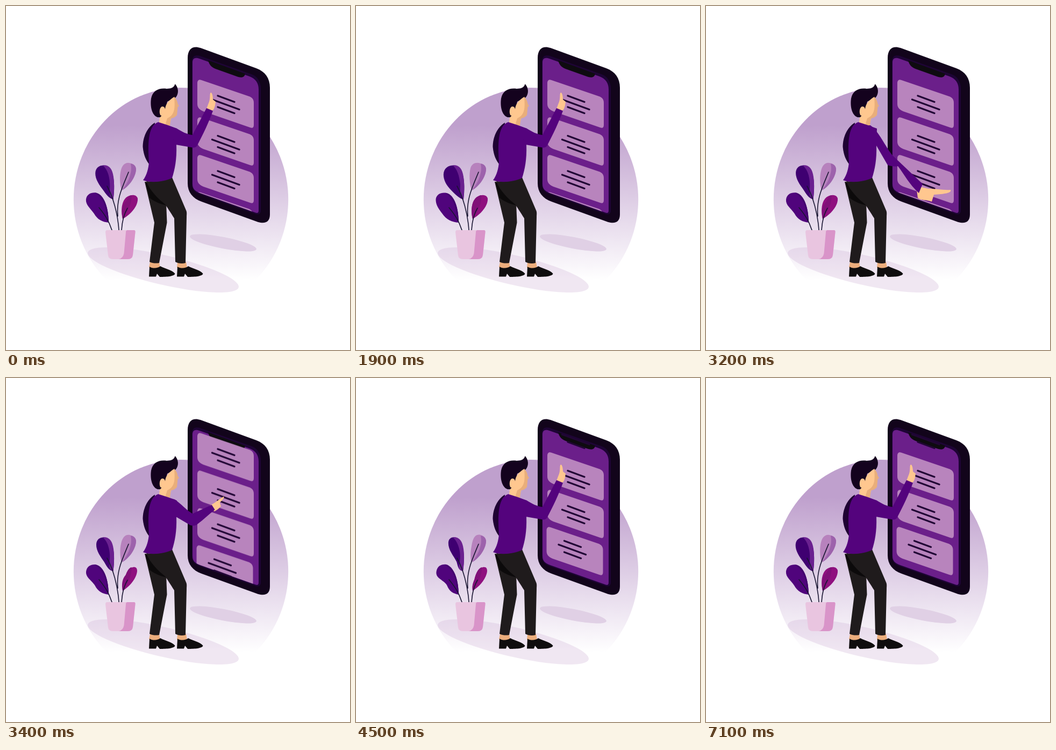
These frames come from a looping animation (640x640 px, 7.2 s). An HTML page:

```html
<!DOCTYPE html>
<html lang="en">
<head>
<meta charset="utf-8">
<title>Scrolling a phone</title>
<style>
  html, body { margin: 0; width: 100%; height: 100%; overflow: hidden; background: #fff; }
  svg { display: block; width: 100%; height: 100%; }

  /* Leaves swing between a narrow and a wide shape. */
  .leaf { d: var(--wide); animation: sway 3600ms cubic-bezier(.37, 0, .63, 1) -2100ms infinite alternate; }
  @keyframes sway { from { d: var(--narrow); } to { d: var(--wide); } }

  .arm { d: var(--up); animation: swipe 7200ms cubic-bezier(.65, 0, .35, 1) infinite; }
  @keyframes swipe {
    0%, 39.58% { d: var(--up); }
    44.44% { d: var(--down); }
    49.39%, 100% { d: var(--up); }
  }

  .list { animation: scroll 7200ms cubic-bezier(.45, 0, .55, 1) infinite; }
  @keyframes scroll {
    0%, 44.44% { transform: translateY(0); }
    50%, 100% { transform: translateY(-69px); }
  }
  .leaving { animation: leave 7200ms linear infinite; }
  @keyframes leave { 0%, 47.3% { opacity: 1; } 49%, 100% { opacity: 0; } }

  .stem { fill: none; stroke: #191632; stroke-width: 1.6; stroke-linecap: round; }
  .text { fill: none; stroke: #210635; stroke-width: 3.4; stroke-linecap: round; }
</style>
</head>
<body>
<svg viewBox="0 0 640 640">
  <defs>
    <linearGradient id="sky" gradientUnits="userSpaceOnUse" x1="0" y1="222" x2="0" y2="510">
      <stop offset="0" stop-color="#bfa0cd"/>
      <stop offset="1" stop-color="#fff"/>
    </linearGradient>
    <path id="bezel" d="M346 104C346 93 352 90 361 93L457 127C468 131 474 141 474 154V380C474 387 470 389 464 387L360 350C350 346 346 341 346 331Z"/>
    <path id="screen" d="M347 105C347 97 352 95 360 98L453 131C464 135 470 143 470 155V380C470 385 468 386 463 384L361 348C351 344 347 340 347 331Z"/>
    <clipPath id="inBezel"><use href="#bezel"/></clipPath>
    <clipPath id="inScreen"><use href="#screen"/></clipPath>
    <path id="card" fill="#b884bd" d="M356 144C356 138 359 136 364 138L452 168C458 170 461 174 461 180V221C461 226 459 228 454 226L367 196C360 193 356 189 356 182Z"/>
    <path id="lines" class="text" d="M394 167L425 178.500M383.500 174L434 192.500M394 188L425 199.500"/>
    <path id="shoe" fill="#0f0d0e" d="M267 485C273 489 283 488 287 484C296 489 309 491 314.500 498C313 503 300 504 286 504L281 498L279 503.500H266Z"/>
  </defs>

  <ellipse cx="325.500" cy="360" rx="199.700" ry="208" fill="url(#sky)"/>
  <ellipse cx="292.500" cy="491" rx="144" ry="27.500" fill="#c39ecb" opacity=".25" transform="rotate(13 292.500 491)"/>
  <ellipse cx="404" cy="440.500" rx="63" ry="10.700" fill="#e0d0e5" transform="rotate(11 404 440.500)"/>

  <g id="phone">
    <path fill="#12041b" d="M338 97C338 80 347 73 362 78L466 116C482 122 491 134 491 152V388C491 401 483 406 469 402L364 364C347 358 338 346 338 330Z"/>
    <use href="#bezel" fill="#1e0435"/>
    <use href="#screen" fill="#6b1f8a"/>
    <path fill="#0e0b10" d="M376 101L445 126C444 132 440 134 432 132L390 117C382 114 378 109 376 101Z"/>
    <g clip-path="url(#inScreen)">
      <g class="list">
        <use href="#card" class="leaving"/>
        <use href="#card" y="70"/>
        <use href="#card" y="140"/>
        <use href="#card" x="-1.500" y="209"/>
      </g>
    </g>
    <g clip-path="url(#inBezel)">
      <g class="list">
        <use href="#lines"/>
        <use href="#lines" y="74.500"/>
        <use href="#lines" y="140"/>
        <use href="#lines" x="-6.500" y="205"/>
      </g>
    </g>
  </g>

  <g id="plant">
    <path class="leaf" fill="#3f0071"
      style="--wide:path('M200 360C192 358 184 350 176 342C168 334 162.500 324 162.500 314C163 300 174 295 186 297C198 300 205 325 200 360Z');
             --narrow:path('M199 359C190 358 190 350 188 342C183 331 172 320 172.500 306C173 297 180 295 187 297C198 300 204 325 199 359Z')"/>
    <path class="leaf" fill="#6b2190"
      style="--wide:path('M180 296.500C192 295 198 303 200 318C202 332 201 348 200 360C192 353 194 342 194 331C192 315 188 303 180 296.500Z');
             --narrow:path('M180 296.500C192 295 198 303 200 318C202 332 201 348 199 359C189 358 191 351 192 346C197 330 192 306 180 296.500Z')"/>
    <path class="leaf" fill="#b782bd"
      style="--wide:path('M215 343C211 330 210 312 213 301C216 292 224 290 232 293C238 294 242 298 242 304C241 320 228 336 215 343Z');
             --narrow:path('M214 343C213 331 213 324 215 314C217 300 221 290 230 291.500C238 293 242 298 242 304C241 320 228 336 214 343Z')"/>
    <path fill="#9d62ac" d="M232 293.500C238 294 242 298 242 304C241 320 228 336 216 343C226 330 236 312 232 293.500Z"/>
    <path class="leaf" fill="#50047c"
      style="--wide:path('M191 403C178 402 168 398 160 386C152 376 148 368 148.500 359C150 349 160 346 169 348C183 352 191 375 191 403Z');
             --narrow:path('M191 403C181 401 174 397 170 386C165 376 148 374 149.500 361C151 349 160 346 168 347C181 350 191 375 191 403Z')"/>
    <path fill="#43006e" d="M165 347.500C182 348 191 375 191 403C185 388 189 362 165 347.500Z"/>
    <path class="leaf" fill="#8f107f"
      style="--wide:path('M217 396C213 380 215 360 227 354C235 350 243 351 245 358C246 372 232 388 217 396Z');
             --narrow:path('M217 396C216 388 217 384 220 376C223 362 228 354 236 352C241 351 244 353 244 359C243 373 230 388 217 396Z')"/>
    <path class="leaf" fill="#801078"
      style="--wide:path('M217 396C213 380 215 360 227 354C229 353 231 352 233 352C235 368 225 384 217 396Z');
             --narrow:path('M217 396C216 388 217 384 220 376C223 362 228 354 234 352C235 368 225 384 217 396Z')"/>
    <path class="stem" d="M188 335C199 355 208 386 210 417M228 309C216 338 205 360 208 391M173 375C182 386 191 398 197 417M226 376C219 388 216 400 215 417"/>
    <path fill="#e9c5e0" d="M188 417H238Q241 417 240.500 421L236 463Q235 471 227 471H198Q191 471 190 464L185 421Q185 417 188 417Z"/>
    <path fill="#d994c9" d="M226 417H238Q241 417 240.500 421L236 463Q235 471 227 471H210Q218 469 219.500 460L223 421Q223 417 226 417Z"/>
  </g>

  <g id="person">
    <path fill="#ecae7d" d="M268 476H285L287 488Q276 492 266 486ZM319 476H335L337 487Q328 491 318 487Z"/>
    <use href="#shoe"/>
    <use href="#shoe" x="52"/>
    <path fill="#1f1b1c" d="M258 327L276 403L267 476C273 479 280 479 285 478L299.500 403L298 366L270 328Z"/>
    <path fill="#0c0a0b" d="M259 327L267 357C275 363 287 369 299 371L296 350Z"/>
    <path fill="#1f1b1c" d="M261 326C280 328 296 325 309 319L335 380C337 384 336 388 336 393L334 478C328 480 320 479 315 476L313 395C306 384 299 373 296 369C285 360 268 345 261 326Z"/>

    <path fill="#1f0233" d="M277 217C262 226 254.500 245 254.500 262C256 278 261 288 267 295L276 240Z"/>
    <path fill="#ffc78f" d="M287 200L285 216Q293 223 304 222L308 206Z"/>
    <path fill="#e9ae7b" d="M300 209C298 215 297 219 296 222Q301 224 305 222L307 208Z"/>
    <path fill="#54037d" d="M283 216C294 219 305 223 318 228L317 259C318 285 314 305 309 320C294 327 270 330 255 324C262 315 265 302 266 291C264 260 263 223 283 216Z"/>

    <path fill="#14021e" d="M282 207C271 203 268 186 270 172C273 157 285 152 299 154C308 154 313 151 314.500 145C321 152 322 162 316 170L300 178L296 196L287 207Z"/>
    <path fill="#ffc78f" d="M296 192C297 182 302 176 313 169L316 181L313 203Q307 209 300 209L287 203C284 195 287 187 291 187Q295 187 296 192Z"/>
    <path fill="#e9ae7b" d="M313 169C317 173 319 177 319.500 182L322 186L319.500 188L318 203Q311 211 300 209C316 202 314 186 313 169Z"/>

    <path class="arm" fill="#ffc78f"
      style="--up:path('M373 191L378 178C380 172 379 166 380 162C383 159 385 167 385 174L390 178C389 186 388 191 384 195Z');
             --down:path('M391 335L414 340C428 340 442 343 455 342C458 348 442 350 424 351L420 364C410 360 400 362 394 357Z')"/>
    <path class="arm" fill="#54037d"
      style="--up:path('M300 222L318 228C328 234 337 239 347 240L373 190L385 195C378 215 366 240 356 259C353 264 349 264 345 263L316 258Z');
             --down:path('M300 222L306 222C322 234 334 262 347 278L403 331L396 348C378 332 369 313 357 298C353 299 343 298 338 296L316 258Z')"/>
  </g>
</svg>
</body>
</html>
```
